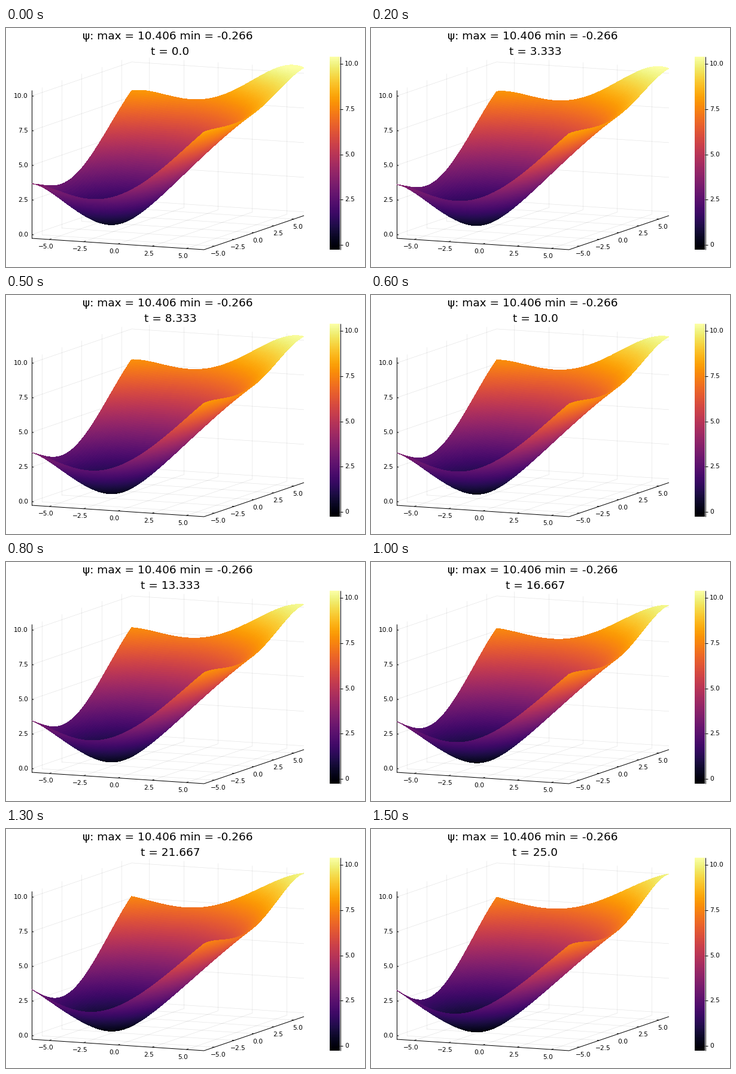
A matplotlib script that plays this animation: 600x400 px, repeating every 1.6 s.

```python
import matplotlib.pyplot as plt
import numpy as np
from matplotlib.animation import FuncAnimation
from matplotlib.collections import LineCollection, PolyCollection

W, H, DPI = 600, 400, 100
FRAMES, INTERVAL = 16, 100
R = 2 * np.pi
Z_MIN, Z_MAX = -0.266, 10.406
TICKS = np.arange(-5, 5.1, 2.5)
Z_TICKS = np.arange(0, 10.1, 2.5)
N = 100

plt.rcParams["font.family"] = "DejaVu Sans"
fig = plt.figure(figsize=(W / DPI, H / DPI), dpi=DPI, facecolor="white")
ax = fig.add_axes([0, 0, 1, 1])
ax.set_xlim(0, W)
ax.set_ylim(H, 0)
ax.axis("off")
cmap = plt.get_cmap("inferno")


def project(x, y, z):
    """Orthographic projection to stage pixels."""
    sx = 270.5 + 22.92 * x + 13.29 * y
    sy = 333 + 1.512 * x - 4.536 * y - 23.2 * (z - Z_MIN)
    return np.stack(np.broadcast_arrays(sx, sy), axis=-1)


def px(size):
    return size * 72 / DPI


def label(x, y, text, size=10.6, ha="center", va="center"):
    return ax.text(x, y, text, fontsize=px(size), ha=ha, va=va, color="black")


def lines(segments, color, width, z):
    ax.add_collection(LineCollection(segments, colors=color,
                                     linewidths=px(width), zorder=z))


def segment(a, b):
    return [project(*a), project(*b)]


def number(v):
    return f"{v:.1f}".replace("-", "\u2212")


def draw_box():
    grid, ticks = [], []
    for v in TICKS:
        grid += [segment((v, -R, Z_MIN), (v, R, Z_MIN)),
                 segment((v, R, Z_MIN), (v, R, Z_MAX)),
                 segment((-R, v, Z_MIN), (R, v, Z_MIN)),
                 segment((-R, v, Z_MIN), (-R, v, Z_MAX))]
        ticks += [segment((v, -R, Z_MIN), (v, -R + 0.25, Z_MIN)),
                  segment((R, v, Z_MIN), (R - 0.15, v, Z_MIN))]
        x, y = project(v, -R, Z_MIN)
        label(x - 6, y + 12.5, number(v))
        x, y = project(R, v, Z_MIN)
        label(x + 6.5, y + 13, number(v))
    for v in Z_TICKS:
        grid += [segment((-R, -R, v), (-R, R, v)),
                 segment((-R, R, v), (R, R, v))]
        ticks.append(segment((-R, -R, v), (-R + 0.15, -R, v)))
        x, y = project(-R, -R, v)
        label(x - 6, y, number(v), ha="right")
    axes = [segment((-R, -R, Z_MIN), (R, -R, Z_MIN)),
            segment((R, -R, Z_MIN), (R, R, Z_MIN)),
            segment((-R, -R, Z_MIN), (-R, -R, Z_MAX))]
    lines(grid, (0, 0, 0, 0.1), 0.7, 1)
    lines(axes + ticks, "black", 1, 2)


def draw_colorbar():
    left, right, top, bottom = 541, 558, 48, 371
    ax.imshow(np.linspace(1, 0, 256)[:, None], cmap=cmap, aspect="auto",
              extent=(left, right, bottom, top), zorder=2)
    marks = [[(right + 0.5, top), (right + 0.5, bottom)]]
    for v in Z_TICKS:
        y = bottom - (v - Z_MIN) / (Z_MAX - Z_MIN) * (bottom - top)
        marks.append([(right, y), (right + 5, y)])
        label(566, y, number(v) if v else "0", ha="left")
    lines(marks, "black", 1, 3)
    ax.set_xlim(0, W)
    ax.set_ylim(H, 0)


def smooth(nodes):
    """Quartic surface through a 5 x 5 net of heights (rows along y)."""
    knots = np.linspace(-1, 1, 5)
    basis = np.vander(u / R, 5) @ np.linalg.inv(np.vander(knots, 5))
    return basis @ np.array(nodes) @ basis.T


u = np.linspace(-R, R, N + 1)
X, Y = np.meshgrid(u, u)
BOWL = np.sqrt((X + 2.4) ** 2 + (Y + 2.4) ** 2 + 4) - 2 + Z_MIN
START = BOWL + smooth([[0.09, 0.80, 0.50, 0.50, 0.77],
                       [0.78, 0.45, 0.90, 1.30, 1.40],
                       [0.85, 0.50, 1.00, 1.50, 1.40],
                       [0.85, 0.80, 1.10, 1.40, 1.20],
                       [0.47, 1.00, 0.95, 1.40, 0.22]])
END = BOWL + smooth([[-0.30, -0.25, -0.30, -0.20, -0.13],
                     [-0.20, 0.00, 0.20, 0.35, 0.35],
                     [-0.05, 0.10, 0.30, 0.45, 0.30],
                     [0.25, 0.20, 0.40, 0.50, 0.60],
                     [0.08, 0.30, 0.35, 0.45, -0.14]])


def corners(a):
    """Corner values of every cell, ordered from back to front."""
    cells = np.stack([a[:-1, :-1], a[:-1, 1:], a[1:, 1:], a[1:, :-1]], axis=2)
    return cells[::-1].reshape(-1, 4, *a.shape[2:])


draw_box()
draw_colorbar()
label(270.5, 19, "ψ: max = 10.406 min = -0.266", 18.5, va="baseline")
clock = label(274.5, 45, "", 18.5, va="baseline")
surface = PolyCollection([], edgecolors="none", antialiaseds=False, zorder=4)
ax.add_collection(surface)


def update(i):
    s = i / (FRAMES - 1)
    z = START + (END - START) * s
    surface.set_verts(corners(project(X, Y, z)))
    level = (corners(z).mean(axis=1) - Z_MIN) / (Z_MAX - Z_MIN)
    surface.set_facecolor(cmap(np.clip(level, 0, 1)))
    clock.set_text(f"t = {round(25 * s, 3)}")
    return surface, clock


anim = FuncAnimation(fig, update, frames=FRAMES, interval=INTERVAL,
                     init_func=lambda: update(0), repeat=True,
                     repeat_delay=0, blit=False)
plt.show()
```
